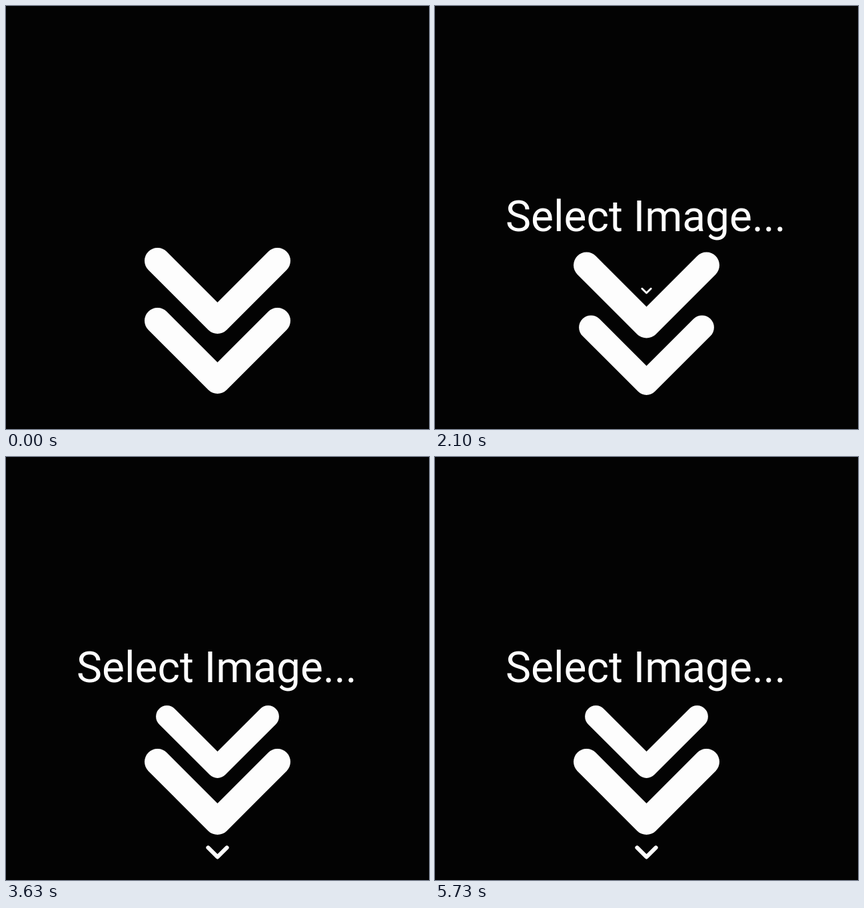
Animation of 635x635 px, one loop 5.76 s. Source, as an HTML page:

```html
<!DOCTYPE html>
<html lang="en">
<head>
<meta charset="utf-8">
<title>Select Image</title>
<style>
  html, body { margin: 0; width: 100%; height: 100%; overflow: hidden; background: #030303; }
  svg { display: block; width: 100vw; height: 100vh; }
  path { fill: none; stroke: #fdfdfd; stroke-width: 39; stroke-linecap: round; stroke-linejoin: round; }
  text { font: 400 64px Roboto, sans-serif; fill: #fff; white-space: pre; }
</style>
</head>
<body>
<svg viewBox="0 0 635 635">
  <text id="label" x="106" y="338"></text>
  <path id="growing" d="M-90-45 0 45 90-45"/>
  <path id="sliding" d="M-90-45 0 45 90-45"/>
  <path id="shrinking" d="M-90-45 0 45 90-45"/>
</svg>
<script>
const LOOP = 5760;
const TICK = 100 / 3;
const STEP = 80;
const STEPS_PER_CYCLE = 12;
const CENTER_X = 317.5;
const TOP_Y = 427.5;
const SLIDE = 89;
const DROP = 90;
const LABEL = "Select Image...";
// Tick at which each character of the label is typed.
const KEY_TICKS = [3, 7, 10, 14, 18, 22, 27, 31, 35, 39, 43, 47, 50, 55, 59];
// Short stalls of the arrows: [start, length] in ms, latest first.
const STALLS = [[4910, 80], [3870, 80], [2900, 10]];

const byId = id => document.getElementById(id);
const label = byId("label");
const arrows = ["growing", "sliding", "shrinking"].map(byId);

const clamp = (value, low, high) => Math.min(high, Math.max(low, value));
const ease = x => x * x * (3 - 2 * x);

function arrowProgress(time) {
  const running = STALLS.reduce(
    (t, [start, length]) => t - clamp(t - start, 0, length), time);
  const step = Math.max(0, Math.floor((running - 20 + 0.01) / STEP));
  return ease((step % STEPS_PER_CYCLE) / STEPS_PER_CYCLE);
}

function place(arrow, y, scale) {
  arrow.setAttribute("visibility", scale > 0 ? "visible" : "hidden");
  arrow.setAttribute("transform", `translate(${CENTER_X} ${y}) scale(${scale})`);
}

function render(time) {
  const tick = Math.floor((time + 5) / TICK);
  const u = arrowProgress(tick * TICK);
  const [growing, sliding, shrinking] = arrows;
  place(growing, TOP_Y, u);
  place(sliding, TOP_Y + SLIDE * u, 1);
  place(shrinking, TOP_Y + DROP * (1 + u), 1 - u);
  label.textContent = LABEL.slice(0, KEY_TICKS.filter(key => key <= tick).length);
}

const begin = performance.now();
function loop() {
  render((performance.now() - begin) % LOOP);
  requestAnimationFrame(loop);
}
loop();
</script>
</body>
</html>
```
